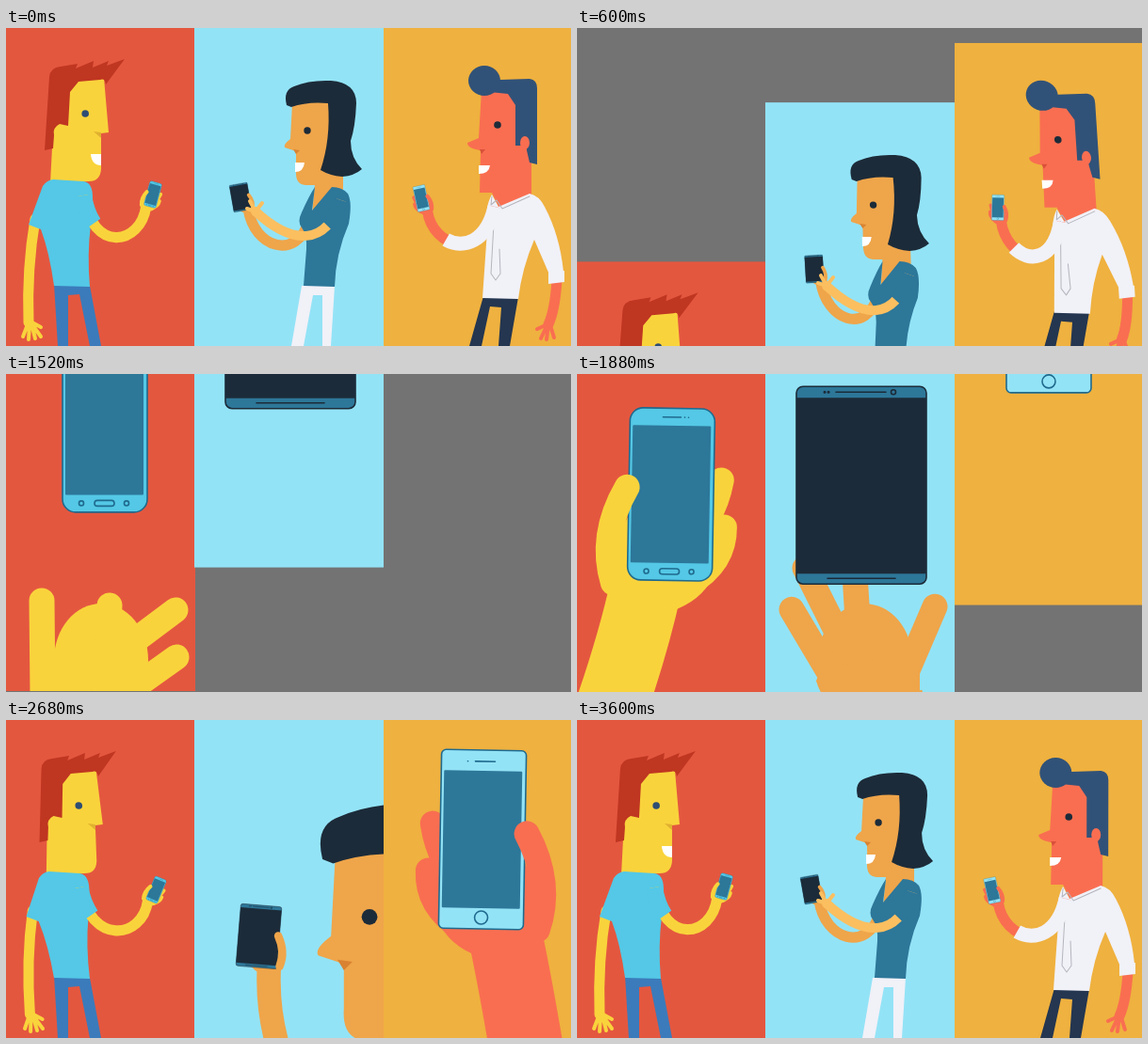
Animation of 600 by 338 pixels, one loop 3640 ms. Source, as an HTML page with a canvas:

```html
<!DOCTYPE html>
<html lang="en">
<head>
<meta charset="utf-8">
<title>Three people, three phones</title>
<style>
html, body { margin: 0; width: 100%; height: 100%; overflow: hidden; background: #737373; }
canvas { display: block; }
</style>
</head>
<body>
<canvas id="stage" width="600" height="338"></canvas>
<script>
const ctx = document.getElementById('stage').getContext('2d');
const LOOP = 3640, STAGGER = 305, HEIGHT = 338;
const NAVY = '#2e4d73', TEAL = '#2d7799', DARK = '#1c2b39', CYAN = '#54c8e6', SKY = '#93e3f6', WHITE = '#f1f1f8';

const clamp = v => Math.max(0, Math.min(1, v));
const mix = (a, b, k) => a + (b - a) * k;
const mixPoint = (a, b, k) => [mix(a[0], b[0], k), mix(a[1], b[1], k)];
const span = (t, start, length) => clamp((t - start) / length);
const easeOut = k => 1 - (1 - k) ** 2;
const easeInOut = k => k < .5 ? 4 * k ** 3 : 1 - 4 * (1 - k) ** 3;

function fill(color, d) {
  ctx.fillStyle = color;
  ctx.fill(new Path2D(d));
}
function line(color, width, d, cap = 'round', dash = []) {
  ctx.strokeStyle = color;
  ctx.lineWidth = width;
  ctx.lineCap = cap;
  ctx.lineJoin = 'round';
  ctx.setLineDash(dash);
  ctx.stroke(new Path2D(d));
  ctx.setLineDash([]);
}
function dot(color, x, y, rx, ry = rx) {
  ctx.fillStyle = color;
  ctx.beginPath();
  ctx.ellipse(x, y, rx, ry, 0, 0, 7);
  ctx.fill();
}
function box(color, x, y, w, h, r, stroke) {
  ctx.beginPath();
  ctx.roundRect(x, y, w, h, r);
  ctx.fillStyle = color;
  ctx.fill();
  if (!stroke) return;
  ctx.strokeStyle = stroke;
  ctx.lineWidth = 1.6;
  ctx.stroke();
}
function ring(color, x, y, r) {
  ctx.strokeStyle = color;
  ctx.lineWidth = 1.6;
  ctx.beginPath();
  ctx.arc(x, y, r, 0, 7);
  ctx.stroke();
}

const redMan = {
  x: 0, width: 201, bg: '#e4573f', skin: '#f9d33c', side: 1,
  zoom: 6.8, focus: [167, 28], close: [105, 128], rest: [156, 177], tilt: 15, swing: -9, forward: 2,
  shoulder: [82, 178], elbows: [[104, 175], [92, 240]], sleeve: [CYAN, 18, 32], shift: 0,
  open: [[75, 5], [76, 55], [5, 0]], openThumb: [[-67, -5], [-66, 95]],
  device() {
    const ink = '#1f6a8e';
    box(CYAN, -45, -91.5, 90, 183, 14, ink);
    box(TEAL, -42, -73, 83, 146, 1);
    line(ink, 1.6, 'M-10-82H9M13-82h.1M17-82h.1');
    box(CYAN, -11, 79, 21, 6, 3, ink);
    ring(ink, -25, 82, 2.5);
    ring(ink, 23, 82, 2.5);
  },
  legs() {
    fill('#3b7bbb', 'M51 272L89 274L101 338H89L78 283L66 284V338H55Z');
  },
  body(smile) {
    line(this.skin, 11, 'M31 203Q22 255 24 313');
    line(this.skin, 4, 'M23 315L18 328M25 315L24 331M27 314L31 330M27 314L37 328M26 312L37 318');
    fill(this.skin, 'M68 57L104 53L109 111L101 112V150Q100 163 88 163L47 165L50 108Z');
    dot(this.skin, 57, 108, 7.5);
    fill('#bf3621', 'M41 130L46 52Q47 42 58 41L76 38L74 43L93 35L92 42L109 35L107 40L126 33L106 60Q105 53 100 55L77 57L68 68L66 104L57 102Q49 106 51 114L50 128Z');
    fill('#e0b030', 'M93 110L101 111V117Z');
    if (smile) fill('#fff', 'M90 134H101V146Q91 146 90 134');
    dot(NAVY, 84.2, 91, 3.8);
    fill(CYAN, 'M50 161Q43 162 39 168L24 209L37 214Q46 238 51 274L89 275Q86 240 90 209L92 180Q92 164 82 163Z');
  }
};

const woman = {
  x: 200, width: 201, bg: SKY, skin: '#efa54a', side: -1,
  zoom: 7.2, focus: [268, 30], close: [302, 171], rest: [249, 180], tilt: -10, swing: 8, forward: 6,
  shoulder: [322, 205], elbows: [[312, 215], [308, 248]], shift: -18, armFirst: true,
  open: [[60, -40], [74, 4], [8, -50]], openThumb: [[-78, 1], [-42, 85]],
  device() {
    box(TEAL, -69, -105, 138, 210, 7, DARK);
    box(DARK, -69, -93, 138, 187, 0);
    line(DARK, 1.6, 'M-27-99H26M-36 99H36');
    line(DARK, 3, 'M-39-99h.1M-35-99h.1');
    ring(DARK, 34, -99, 2.5);
  },
  legs() {
    fill(WHITE, 'M314 274H349L345 338H336V284H326L316 338H303Z');
  },
  body(smile) {
    fill(this.skin, 'M329 155H358V172L345 176L325 198Z');
    fill(this.skin, 'M304 80L345 78V150L331 167H318Q307 166 308 152V131L296 127Q294 124 302 118Z');
    fill('#d98332', 'M305 129L312 130L308 134Z');
    if (smile) fill('#fff', 'M307 143H317Q316 153 307 153Z');
    dot(DARK, 320, 109, 3.7);
    fill(DARK, 'M298 82Q294 66 306 62Q322 55 345 56Q372 58 372 80Q371 105 366 120Q366 138 378 150Q370 157 357 158Q344 157 334 151Q345 118 342 80Q320 78 303 84Z');
    fill(TEAL, 'M328 169Q322 178 314 196Q309 206 314 212Q320 220 319 235L316 274L349 275Q350 240 364 208Q368 185 363 176Q357 169 346 169L325 194Z');
  },
  frontArm(reach, lean) {
    const color = '#fbbf60', [x, y] = mixPoint([272, 213], [265, 195], reach);
    const d = `M${356 + lean / 2} 183C${340 + lean / 2} 232 ${x + 39} ${y + 36} ${x} ${y}`;
    line(color, 10, d, 'butt');
    dot(color, x, y, 5);
    line(color, 4, `M${x} ${y}l-6-11M${x} ${y}l7-9M${x} ${y}l-9-3`);
    line(TEAL, 15, d, 'butt', [31, 999]);
  }
};

const orangeMan = {
  x: 401, width: 199, bg: '#efb13f', skin: '#f96e51', side: -1,
  zoom: 7, focus: [466, 32], close: [501, 127], rest: [441, 181], tilt: -12, swing: 20, forward: 12,
  shoulder: [519, 190], elbows: [[495, 220], [506, 248]], sleeve: [WHITE, 15, 74], shift: 0,
  open: redMan.open, openThumb: redMan.openThumb,
  device() {
    const ink = '#1f6a8e';
    box(SKY, -45, -95, 90, 190, 5, ink);
    box(TEAL, -42, -73, 83, 146, 1);
    line(ink, 1.6, 'M-9-83H12M-17-83h.1');
    ring(ink, 0, 83, 7);
  },
  legs() {
    fill('#243650', 'M507 285L544 286L535 338H523L526 297L514 296L505 338H492Z');
  },
  body(smile) {
    line(this.skin, 11, 'M585 268Q583 300 576 315');
    line(this.skin, 4, 'M575 315L564 320M575 315L568 330M576 316L574 331M578 316L582 329');
    fill(this.skin, 'M505 66L540 64L558 80V178L524 192L516 175H503L504 130Q490 128 490 122L502 117Z');
    dot('#315278', 508, 56, 17, 16);
    fill('#315278', 'M504 67Q512 55 525 55L556 54Q564 55 564 64V145L556 143L553 130V118Q549 114 549 125H541V82L533 70Z');
    dot(this.skin, 551, 122, 5, 7);
    fill('#d9503a', 'M503 129L509 129L505 134Z');
    if (smile) fill('#fff', 'M502 146H514Q513 155 502 155Z');
    dot(DARK, 522, 103, 3.8);
    fill(WHITE, 'M516 177Q508 190 511 215L506 287L544 288Q548 255 561 225L577 262L592 259Q588 220 572 190Q566 178 556 176L523 190Z');
    fill(WHITE, 'M576 260L593 258V270L576 272Z');
  },
  details() {
    line('#b5b5bd', 1, 'M516 179L515 188L521 183L527 192L556 179M519 190L515 261L520 268L525 261L524 235');
  }
};

// Three fingers: roots in the palm, bends and tips when gripping.
const ROOTS = [[15, 50], [20, 95], [0, 80]];
const BENDS = [[45, 30], [58, 72], [5, 40]];
const TIPS = [[53, -16], [57, 34], [10, 0]];

function finger(color, grip, [openTip, openRoot], [tip, root, bend]) {
  const middle = mixPoint(openTip, openRoot, .5);
  line(color, 27, `M${mixPoint(openRoot, root, grip)}Q${mixPoint(middle, bend, grip)} ${mixPoint(openTip, tip, grip)}`);
}

function hand(who, layer, grip, rise) {
  ctx.save();
  ctx.scale(who.side, 1);
  ctx.translate(who.shift * grip, rise);
  if (layer === 'back') {
    fill(who.skin, 'M-62 60V105L8 122Q40 108 48 80L30 30Z');
    dot(who.skin, -4, 58, 50, 60);
    ROOTS.forEach((root, i) => finger(who.skin, grip, [who.open[i], root], [TIPS[i], root, BENDS[i]]));
  } else {
    finger(who.skin, grip, who.openThumb, [[-47, -7], [-60, 95], [-76, 45]]);
  }
  ctx.restore();
}

function drawArm(who, m) {
  const { side, zoom, skin, sleeve } = who, { p, lean, back } = m;
  const pull = m.grip * (1 - p), bump = Math.sin(Math.PI * p);
  const close = who.close.map((c, k) => (c - who.focus[k] * (1 - zoom)) / zoom);
  const x = mix(close[0] - side * 5 * pull / zoom, who.rest[0], p ** 3) + side * back / 2;
  const y = mix(close[1], who.rest[1], p ** 1.2) + back / 2;
  const angle = (who.tilt * p * p + who.swing * bump + side * 1.1 * back + pull) * Math.PI / 180;

  // Wrist position follows the device frame.
  const lx = side * (-25 + who.shift * m.grip) / zoom, ly = (98 + m.rise) / zoom;
  const wx = x + lx * Math.cos(angle) - ly * Math.sin(angle);
  const wy = y + lx * Math.sin(angle) + ly * Math.cos(angle);
  const [sx, sy] = who.shoulder, elbow = mixPoint(...who.elbows, p);
  const shift = lean * (275 - sy) / 184;
  const bendX = wx + side * (-9 + 3 * p + 11 * bump), bendY = wy + 41 + 15 * bump;
  const d = `M${sx + shift} ${sy}C${elbow[0] + shift / 2} ${elbow[1]} ${bendX} ${bendY} ${wx} ${wy}`;
  line(skin, 11.2, d, 'butt');
  if (sleeve) line(sleeve[0], sleeve[1], d, 'butt', [sleeve[2], 999]);

  ctx.save();
  ctx.translate(x, y);
  ctx.rotate(angle);
  ctx.scale(1 / zoom, 1 / zoom);
  hand(who, 'back', m.grip, m.rise);
  ctx.save();
  ctx.translate(0, m.drop);
  who.device();
  ctx.restore();
  hand(who, 'front', m.grip, m.rise);
  ctx.restore();
}

function drawBody(who, m) {
  const skew = -m.lean / 184;
  who.legs();
  ctx.save();
  ctx.transform(1, 0, skew, 1, -skew * 275, 0);
  who.body(m.smile);
  if (who.details) who.details();
  ctx.restore();
}

function motion(who, i, t) {
  const m = { top: 0, p: 1, grip: 1, rise: 0, drop: 0, reach: 1, smile: true };
  if (t < 1000) {
    m.top = HEIGHT * span(t, 78 + 130 * i, 565) ** 4;
    const k = span(t, 0, 600);
    m.back = -who.forward * k * k * (3 - 2 * k);
  } else {
    const local = t - STAGGER * i;
    m.top = -HEIGHT * (1 - easeOut(span(local, 1016, 534)));
    // The device falls on its own, independent of the panel.
    m.drop = -HEIGHT * (1 - easeOut(span(local, 1088, 807))) - m.top;
    m.rise = 250 * (1 - easeOut(span(local, 1400, 390)));
    m.grip = span(local, 1790, 90);
    m.p = easeInOut(span(local, 2111, 500));
    m.reach = easeInOut(span(local, 2650, 330));
    m.smile = local > 2720;
    m.back = 12 * Math.sin(Math.PI * easeOut(span(local, 2570, 1070 - STAGGER * i)));
  }
  m.lean = -who.side * m.back;
  return m;
}

function drawPanel(who, i, t) {
  const m = motion(who, i, t);
  if (Math.abs(m.top) >= HEIGHT) return;
  const s = who.zoom ** (1 - m.p);
  ctx.save();
  ctx.translate(0, m.top);
  ctx.beginPath();
  ctx.rect(who.x, 0, who.width, HEIGHT);
  ctx.clip();
  ctx.fillStyle = who.bg;
  ctx.fillRect(who.x, 0, who.width, HEIGHT);
  ctx.translate(who.focus[0] * (1 - s), who.focus[1] * (1 - s));
  ctx.scale(s, s);
  const parts = [drawBody, drawArm];
  if (who.armFirst) parts.reverse();
  // The figure itself stays out of the close-up.
  parts.forEach(part => { if (part === drawArm || m.p > 0) part(who, m); });
  if (who.frontArm && m.p > 0) who.frontArm(m.reach, m.lean);
  ctx.restore();
}

function render() {
  const t = performance.now() % LOOP;
  ctx.fillStyle = '#737373';
  ctx.fillRect(0, 0, 600, HEIGHT);
  [redMan, woman, orangeMan].forEach((who, i) => drawPanel(who, i, t));
  requestAnimationFrame(render);
}
render();
</script>
</body>
</html>
```
